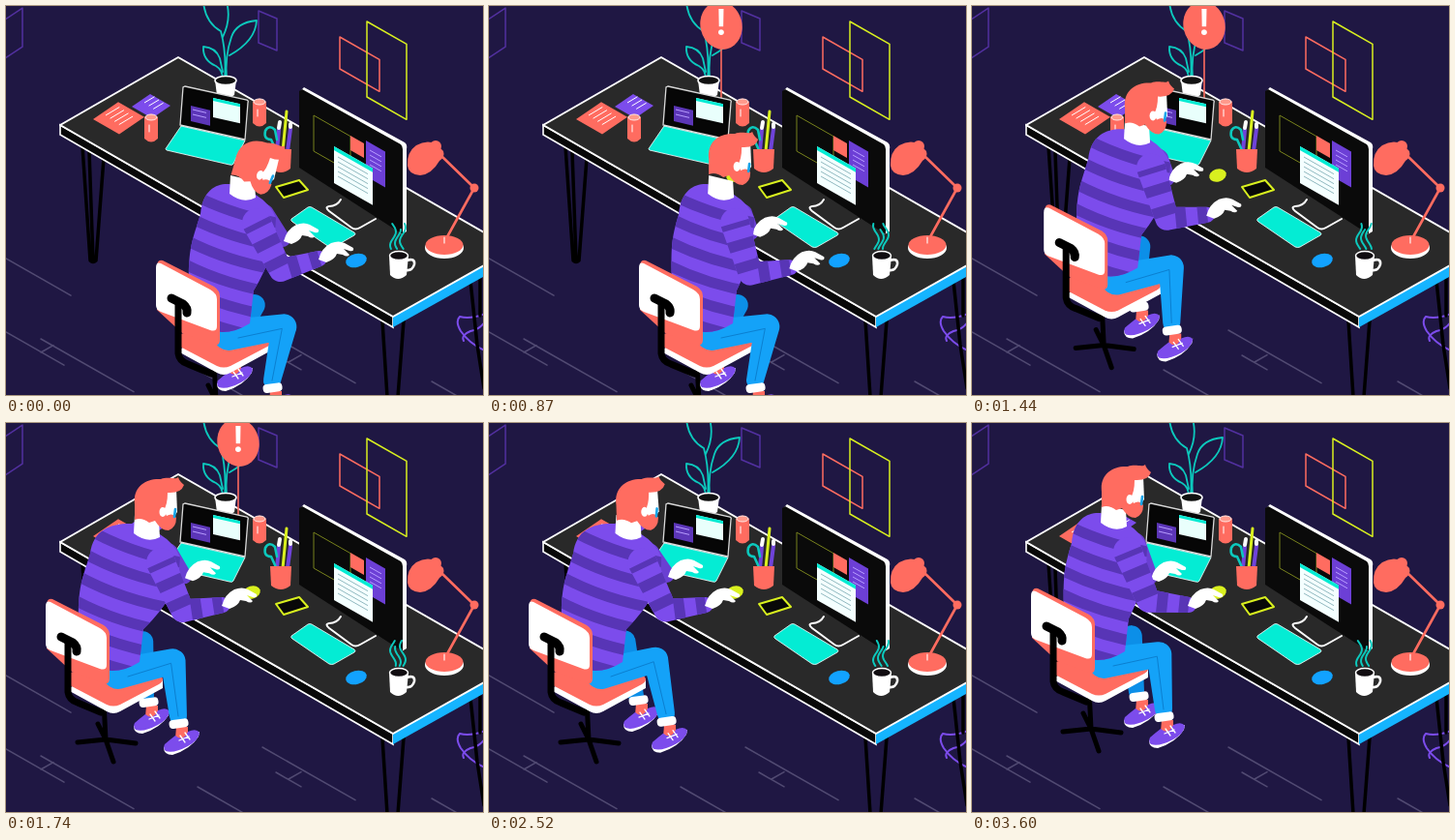
Animation, 493 px wide and 402 px high, one loop 3.63 s. Source, as an HTML page:

```html
<!DOCTYPE html>
<html lang="en">
<head>
<meta charset="utf-8">
<title>Two desks, one chair</title>
<style>
  html, body { margin: 0; width: 100%; height: 100%; overflow: hidden; background: #1f1743; }
  svg { display: block; width: 493px; height: 402px; }
  .line { fill: none; stroke-linecap: round; stroke-linejoin: round; }
  .coral { fill: #ff6c60; }
  .teal { fill: #04ecd4; }
  .white { fill: #fff; }
  .alert { opacity: 0; animation: alert 3630ms linear infinite; }
  @keyframes alert {
    0%, 18% { opacity: 0; }
    23%, 55.5% { opacity: 1; }
    61.5%, 100% { opacity: 0; }
  }
</style>
</head>
<body>
<svg viewBox="0 0 493 402">
  <defs>
    <clipPath id="torsoClip"><path id="torsoMask"/></clipPath>
    <clipPath id="sleeveClip"><path id="sleeveMask"/></clipPath>
    <g id="can">
      <path class="coral" d="M-7-11V11Q0 18 7 11V-11Q0-18-7-11Z"/>
      <ellipse cy="-11" rx="6" ry="3" fill="#ff9a8c" stroke="#fff" stroke-width=".8"/>
      <path class="line" stroke="#fff" d="M-2-3V4"/>
    </g>
    <g id="shoe">
      <path class="coral" d="M-5-14H7V-2H-6Z"/>
      <rect class="white" x="-10" y="-22" width="20" height="9" rx="4" transform="rotate(-8)"/>
      <path class="white" d="M-18 7Q-18 15-9 15Q10 9 18-4L19-9Z"/>
      <path fill="#7c4cec" d="M-17 4Q-10-2-6-5Q2 2 7-9Q16-13 19-8Q18 0 7 6Q-8 14-16 11Q-19 8-17 4Z"/>
      <path class="line" stroke="#fff" stroke-width="1.3" d="M-1-5L4 2M4-8L9-1M-2 0L8-4"/>
    </g>
    <path id="hand" class="white" d="M-17 9Q-14-3-4-8Q4-11 10-8L19-3Q20 1 15 0L9-2L15 4Q13 7 8 4L2 3Q0 9-9 12Z"/>
  </defs>

  <g id="room" class="line" stroke-width="1.5"></g>
  <path class="line" stroke="#7c4cec" stroke-width="2" d="M495 318Q480 324 469 321Q464 326 470 336Q480 350 495 356M473 346Q470 340 480 336Q490 334 495 326"/>

  <!-- desk -->
  <path class="line" stroke="#000" stroke-width="3.5" d="M79 145L87 263Q90 266 93 263L101 157M86 150L90 263M389 325L394 404M411 325L405 404M480 284L487 350L494 395M490 282V320"/>
  <path d="M56 123L400 321V332L56 133Z" fill="#080808" stroke="#fff" stroke-width="1.6"/>
  <path d="M400 321L495 268V279L400 332Z" fill="#15b4ff"/>
  <path class="line" style="fill:#292929" stroke="#fff" stroke-width="2" d="M496 267L400 321L56 123L178 53L496 235"/>

  <g id="papers"></g>
  <use href="#can" x="150" y="126"/>

  <!-- plant -->
  <g class="line" stroke="#0cc9bd" stroke-width="1.8">
    <path d="M226 76Q228 48 222 26Q206 17 204-4M224 32Q233 14 228-4"/>
    <path d="M228 76Q226 52 233 32Q238 17 259 15Q258 36 231 51"/>
    <path d="M224 76Q224 66 217 62Q203 56 204 42Q217 43 221 54L224 68"/>
  </g>
  <path class="white" d="M216 77L218 92Q227 99 236 92L238 77Z"/>
  <ellipse cx="227" cy="77" rx="11" ry="4.5" fill="#111" stroke="#fff" stroke-width="1.5"/>

  <g class="alert">
    <path class="line" stroke="#ff6c60" stroke-width="1.6" d="M240 40V98"/>
    <ellipse class="coral" cx="240" cy="20" rx="21.5" ry="25" transform="rotate(-14 240 20)"/>
    <text x="240" y="30" text-anchor="middle" fill="#fff" font-family="Inter, sans-serif" font-size="37" font-weight="600">!</text>
  </g>

  <!-- laptop -->
  <path d="M185 83L249 97Q251 98 250 100L247 138L180 123L183 84Z" fill="#060606" stroke="#d8d8d8" stroke-width="1.3"/>
  <g id="laptop"></g>
  <path class="teal" stroke="#fff" stroke-width=".8" d="M181 124L247 139L235 163Q234 165 231 164L166 149Q164 148 166 146Z"/>
  <use href="#can" x="262" y="110"/>

  <!-- pen cup -->
  <g class="line" stroke-width="4">
    <path stroke="#d9f01f" stroke-width="3" d="M286 150L290 109"/>
    <path stroke="#6f43da" d="M280 150L282 128M291 150L294 127"/>
    <path stroke="#fff" d="M282 126L283 120M294 125V122"/>
    <path stroke="#0cc9bd" stroke-width="2.6" d="M279 149L274 138Q266 138 268 129Q272 122 278 128L280 138"/>
  </g>
  <path class="coral" d="M273 148L274 168Q284 176 294 168L295 148Z"/>

  <path d="M279 187L303 180L312 190L287 198Z" fill="#080808" stroke="#d9f01f" stroke-width="2" stroke-linejoin="round"/>
  <ellipse cx="254" cy="175" rx="9" ry="6.5" fill="#d9f01f" transform="rotate(-18 254 175)"/>

  <!-- monitor -->
  <path class="line" stroke="#fff" stroke-width="2" d="M346 200Q342 207 334 207Q329 208 334 212L357 229Q361 232 366 229L382 220"/>
  <path class="white" d="M303 89L308 84L412 141Q415 143 414 148V233L409 236Z"/>
  <path fill="#0a0a0a" d="M303 88L306 86L408 143Q410 145 410 148V236L303 167Z"/>
  <g id="monitor"></g>

  <!-- keyboard, mouse, mug -->
  <path class="teal" stroke="#fff" stroke-width=".8" d="M295 220L312 208Q314 207 316 208L360 234Q362 236 360 237L339 249Q337 250 334 249L296 223Q294 222 295 220Z"/>
  <ellipse cx="362" cy="263" rx="11" ry="7" fill="#12a2ff" transform="rotate(-14 362 263)"/>
  <path class="line" stroke="#fff" stroke-width="2.6" d="M414 263Q423 260 422 267Q420 274 413 273"/>
  <path class="white" d="M396 258L397 278Q405 286 414 278L416 258Z"/>
  <ellipse cx="406" cy="258" rx="9.5" ry="4.5" fill="#100c10" stroke="#fff" stroke-width="1.5"/>
  <path id="steam" class="line" stroke="#0cc9bd" stroke-width="2"/>

  <!-- lamp -->
  <ellipse class="white" cx="453" cy="250" rx="20" ry="11"/>
  <ellipse class="coral" cx="453" cy="247" rx="19.5" ry="10"/>
  <path class="line" stroke="#ff6c60" stroke-width="2.6" d="M453 244L484 188L448 153"/>
  <g class="coral">
    <circle cx="484" cy="188" r="4.5"/>
    <circle cx="444" cy="145" r="6"/>
    <path d="M415 165Q414 151 424 144Q434 138 444 142L452 150Q454 156 448 160Q440 174 428 175Q416 174 415 165Z"/>
  </g>
  <path class="line" stroke="#fff" stroke-width="1.1" d="M453 239V245"/>

  <!-- man and chair -->
  <g class="chair line" stroke="#000" stroke-width="5">
    <path d="M215 368L217 408L188 411M217 408L225 431M217 408L248 412M217 408L209 392"/>
  </g>
  <path id="farLeg" fill="#0c8fe8"/>
  <use id="farShoe" href="#shoe"/>
  <g class="chair">
    <path class="white" d="M176 356L218 379Q225 383 232 379L276 355V346L235 330Z"/>
    <path class="coral" d="M176 340L232 326L272 341Q280 346 272 351L232 372Q225 375 218 372L176 350Z"/>
  </g>
  <path id="nearLeg" fill="#14a2f8"/>
  <path id="seam" class="line" stroke="#0b7fd0"/>
  <use id="nearShoe" href="#shoe"/>
  <path id="farArm" fill="#6a40d2"/>
  <use id="farHand" href="#hand"/>
  <path id="torso" fill="#7c4cec"/>
  <path id="stripes" class="line" stroke="#5835b6" stroke-width="11" clip-path="url(#torsoClip)"/>
  <path id="sleeve" fill="#7c4cec"/>
  <g clip-path="url(#sleeveClip)">
    <path id="bands" fill="none" stroke="#5835b6" stroke-width="34" stroke-dasharray="11 12" stroke-dashoffset="-18"/>
  </g>
  <use id="nearHand" href="#hand"/>
  <path id="neck" class="white"/>
  <g id="head">
    <path class="white" d="M4-14L18-16L19 8L13 16L0 15Z"/>
    <path class="coral" d="M-25 0C-27-18-14-27 2-26C10-29 17-25 20-28Q21-24 26-20Q23-11 9-12Q9 0 5 6L8 12Q14 8 18 14Q18 24 10 27Q2 27-4 17L-10 19Q-18 13-25 16Z"/>
    <ellipse class="white" cx="4" cy="8" rx="3.5" ry="5"/>
    <path class="line" stroke="#18a6ea" stroke-width="2.6" d="M17 5L16 13"/>
  </g>
  <g class="chair">
    <path class="coral" d="M162 263L215 290Q221 294 221 300V345Q221 352 214 350L182 338L156 314V270Q156 261 162 263Z"/>
    <path class="white" d="M160 266L211 293Q218 297 218 303V331Q218 337 211 335L160 316Q155 314 155 309V271Q155 264 160 266Z"/>
    <path class="line" stroke="#000" stroke-width="9" d="M171 302L183 308Q188 312 187 317"/>
    <path class="line" stroke="#000" stroke-width="7" d="M178 308V359Q179 367 188 370L212 380"/>
  </g>
</svg>
<script>
const LOOP = 3630, SLOPE = 0.57;
const $ = id => document.getElementById(id);
const setPath = (id, d) => $(id).setAttribute('d', d);

// Static pieces that follow the isometric grid.
function shape(group, d, fill, stroke = 'none') {
  const el = document.createElementNS('http://www.w3.org/2000/svg', 'path');
  el.setAttribute('d', d);
  el.setAttribute('fill', fill);
  el.setAttribute('stroke', stroke);
  $(group).append(el);
}
const pane = (x, y, w, h, slope = SLOPE) => `M${x} ${y}l${w} ${w * slope}v${h}l${-w} ${-w * slope}z`;
const ray = (x, y, len, slope = SLOPE) => `M${x} ${y}l${len} ${len * slope}`;

function textLines(group, x, y, len, count, dx, dy, slope, color) {
  let d = '';
  for (let i = 0; i < count; i++) d += ray(x + i * dx, y + i * dy, len, slope);
  shape(group, d, 'none', color);
}

function paper(x, y, a, b, fill, lines) {
  shape('papers', `M${x} ${y}l${b} ${-b * .68}l${a} ${a * SLOPE}l${-b} ${b * .68}z`, fill);
  textLines('papers', x + 13, y - 4, b * .55, lines, 4.6, 3.2, -.6, '#fff');
}

function buildScene() {
  const purple = '#5230a0', coral = '#ff6c60', lilac = '#b79cff', teal = '#04ecd4';
  shape('room', pane(261, 5, 19, 33, .42) + pane(-4, 16, 21, 40, -.66), 'none', purple);
  shape('room', pane(345, 32, 41, 33), 'none', coral);
  shape('room', pane(373, 16, 41, 78), 'none', '#d9f01f');
  shape('room', ray(0, 261, 67) + ray(0, 337, 60) + ray(36, 344, 96) + ray(36, 358, 13, -SLOPE)
    + ray(265, 335, 96) + ray(279, 361, 26) + ray(292, 368, 13, -SLOPE) + ray(198, 376, 48) + ray(440, 388, 30), 'none', '#514a72');

  paper(130, 104, 21, 19, '#7c4cec', 3);
  paper(90, 117, 27, 26, coral, 4);

  shape('laptop', pane(191, 103, 20, 16, .24), '#5c36b8');
  shape('laptop', pane(214, 95, 28, 20, .22), '#e9fffc');
  shape('laptop', pane(214, 95, 28, 3, .22), teal);
  textLines('laptop', 193, 107, 14, 2, 0, 5, .24, lilac);

  shape('monitor', pane(318, 113, 38, 37), 'none', '#77811c');
  shape('monitor', pane(356, 134, 14, 15), coral);
  shape('monitor', pane(372, 139, 20, 37), '#6c3fd6');
  textLines('monitor', 376, 149, 12, 4, 0, 5, SLOPE, lilac);
  shape('monitor', pane(339, 145, 40, 38), '#f4ffff');
  shape('monitor', pane(339, 145, 40, 4), teal);
  textLines('monitor', 343, 156, 31, 5, 0, 5, SLOPE, '#91b9c0');
}

// Points and motion.
const add = ([x, y], dx, dy) => [x + dx, y + dy];
const mix = (a, b, k) => a.map((v, i) => v + (b[i] - v) * k);
const pt = p => p.map(v => v.toFixed(2)).join(' ');
const place = (el, p, extra = '') => el.setAttribute('transform', `translate(${pt(p)}) ${extra}`);

function ramp(t, from, to) {
  const u = Math.min(1, Math.max(0, (t - from) / (to - from)));
  return u * u * u * (10 - 15 * u + 6 * u * u);
}

// Middle joint of a two-bone limb.
function joint(a, b, la, lb, side) {
  const dx = b[0] - a[0], dy = b[1] - a[1], dist = Math.hypot(dx, dy);
  const reach = Math.min(dist, la + lb);
  const along = (la * la - lb * lb + reach * reach) / (2 * reach);
  const out = side * Math.sqrt(Math.max(0, la * la - along * along));
  return add(a, (dx * along - dy * out) / dist, (dy * along + dx * out) / dist);
}

// Tapered capsule between two points.
function limb(a, b, ra, rb) {
  const dx = b[0] - a[0], dy = b[1] - a[1], len = Math.hypot(dx, dy) || 1;
  const side = (p, r) => pt(add(p, -dy / len * r, dx / len * r));
  return `M${side(a, ra)}A${ra} ${ra} 0 0 1 ${side(a, -ra)}L${side(b, -rb)}A${rb} ${rb} 0 0 1 ${side(b, rb)}Z`;
}

function drawLegs(chair, slide, kick, settle) {
  const nearHip = add(chair, 230, 340), farHip = add(chair, 235, 325);
  const nearAnkle = add(chair, 275 + 17 * slide + 13 * kick, 387 - 3 * slide - 6 * kick + 4 * settle);
  const farAnkle = add(chair, 231 + 28 * slide + 18 * kick + 5 * settle, 361 + 4 * slide - 5 * kick + 5 * settle);
  const nearKnee = joint(nearHip, nearAnkle, 58, 57, -1);
  const farKnee = joint(farHip, farAnkle, 27, 58, -1);
  setPath('farLeg', limb(farHip, farKnee, 13, 11) + limb(farKnee, farAnkle, 11, 8));
  setPath('nearLeg', limb(nearHip, nearKnee, 16, 13) + limb(nearKnee, nearAnkle, 13, 9));
  setPath('seam', `M${pt(add(nearHip, 10, 3))}L${pt(add(nearKnee, -2, 2))}L${pt(nearAnkle)}`);
  place($('farShoe'), add(farAnkle, 5, 22));
  place($('nearShoe'), add(nearAnkle, 3, 25));
}

function drawTorso(neck, chair, lean) {
  const n = (x, y) => pt(add(neck, x, y)), c = (x, y) => pt(add(chair, x, y));
  const back = -44 - Math.max(0, lean);
  const body = `M${n(-14, -13)}C${n(back * .6, -14)} ${n(back * .95, -8)} ${n(back, 18)}`
    + `C${n(back - 8, 44)} ${c(188, 250)} ${c(189, 288)}L${c(200, 330)}Q${c(225, 345)} ${c(252, 328)}`
    + `L${c(256, 294)}Q${n(34, 60)} ${n(34, 22)}Q${n(28, 7)} ${n(13, -2)}Z`;
  setPath('torso', body);
  setPath('torsoMask', body);
  let stripes = '';
  for (let k = 0; k < 6; k++) {
    const mid = mix(add(neck, -8, 13), add(chair, 220, 328), k / 5);
    stripes += `M${pt(add(mid, -60, -24))}Q${pt(add(mid, -10, 6))} ${pt(add(mid, 54, 16))}`;
  }
  setPath('stripes', stripes);
  setPath('neck', `M${n(-13, -22)}L${n(12, -16)}L${n(13, 1)}Q${n(0, 8)} ${n(-14, -3)}Z`);
}

function drawArms(neck, near, far) {
  const shoulder = add(neck, 14, 27), wrist = add(near, -16, 8);
  const elbow = joint(shoulder, wrist, 55, 42, 1);
  const sleeve = limb(shoulder, elbow, 15, 12) + limb(elbow, wrist, 12, 8);
  setPath('sleeve', sleeve);
  setPath('sleeveMask', sleeve);
  setPath('bands', `M${pt(shoulder)}L${pt(elbow)}L${pt(wrist)}`);
  setPath('farArm', limb(add(neck, 20, 20), add(far, -18, 7), 13, 8));
  place($('nearHand'), near);
  place($('farHand'), far);
}

function drawSteam(t) {
  let d = '';
  for (let strand = 0; strand < 3; strand++) {
    for (let y = 251; y > 224 + strand % 2 * 5; y -= 2) {
      const x = 400 + strand * 5 + 3 * Math.sin(y / 4.5 + strand * .5 + t / LOOP * 6 * Math.PI);
      d += `${y === 251 ? 'M' : 'L'}${x.toFixed(1)} ${y}`;
    }
  }
  setPath('steam', d);
}

const chairParts = document.querySelectorAll('.chair');
let start;
function draw(now) {
  start ??= now;
  const t = (now - start) % LOOP;
  const nod = 1 - ramp(t, 60, 500);
  const startle = ramp(t, 620, 1200);
  const slide = ramp(t, 1040, 1690);
  const settle = ramp(t, 2650, 3270);
  const kick = ramp(t, 2300, 2800) - ramp(t, 2800, 3270);
  const lean = 28 * slide - 13 * startle - 19 * ramp(t, 2300, 3270);
  const tap = (1 - startle + slide) * Math.sin(t / LOOP * 44 * Math.PI);

  const chair = [20 * settle - 114 * slide, -81 * slide - 11 * settle];
  const neck = add(chair, 245 + lean, 197 + slide);
  const near = mix(mix([340, 253], [306, 276], startle), [240, 180], slide);
  const far = mix(mix([304, 234], [264, 216], startle), [202, 151], slide);

  chairParts.forEach(el => place(el, chair));
  drawLegs(chair, slide, kick, settle);
  drawTorso(neck, chair, lean);
  drawArms(neck, add(near, 0, tap * (1 - slide)), add(far, 0, -tap));
  place($('head'), add(neck, 12 + 4 * nod, -39 + 8 * nod + 6 * slide - 2 * settle), `rotate(${16 * nod - 5 * kick})`);
  drawSteam(t);
  requestAnimationFrame(draw);
}
buildScene();
requestAnimationFrame(draw);
</script>
</body>
</html>
```
